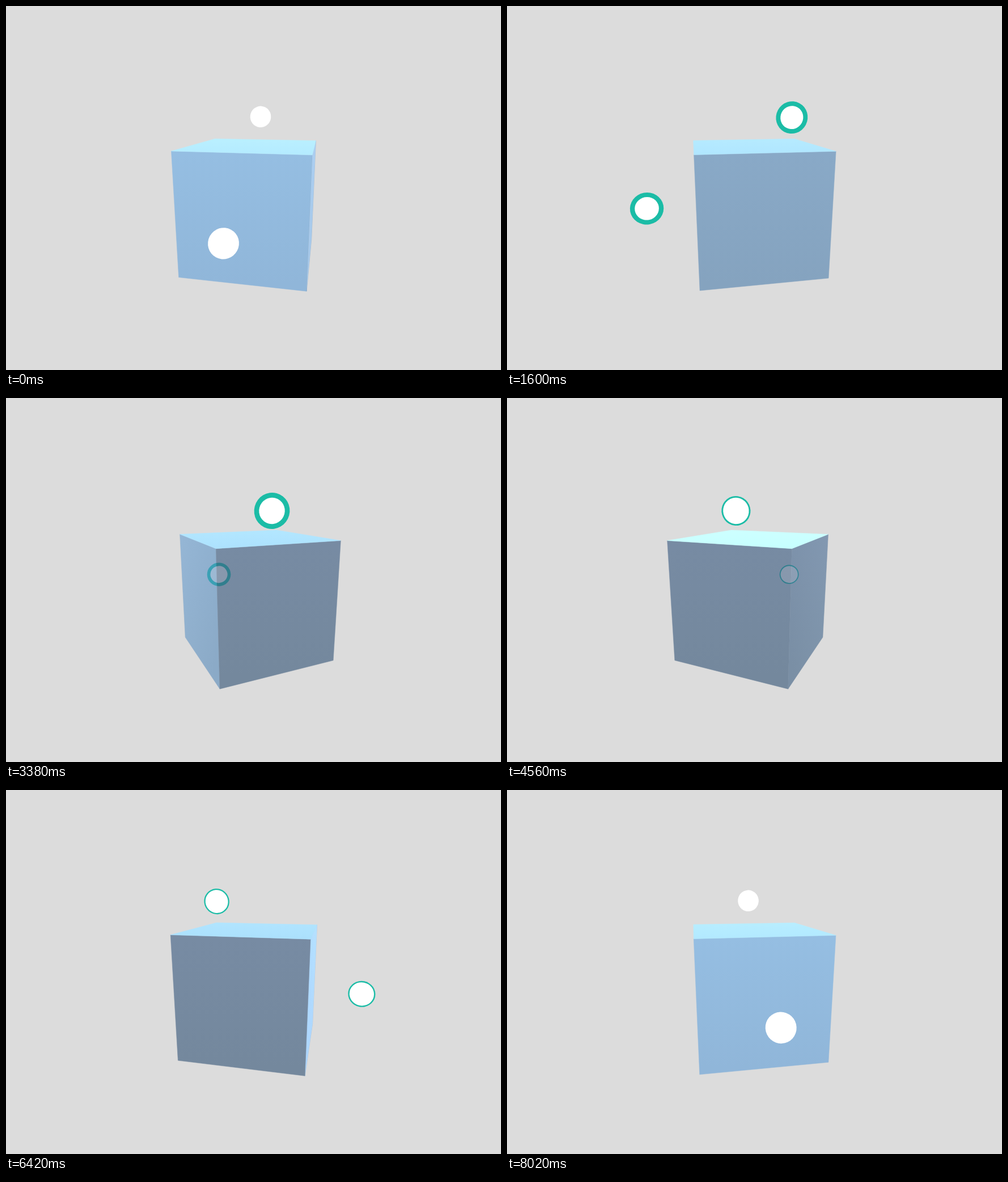
Write an HTML page with a canvas that moves like this. It is 873x642 px and loops after 8.04 s.

```html
<!DOCTYPE html>
<html>
<head>
<meta charset="utf-8">
<style>
html, body { margin: 0; width: 100%; height: 100%; overflow: hidden; background: #dcdcdc; }
canvas { display: block; }
</style>
</head>
<body>
<canvas id="stage" width="873" height="642"></canvas>
<script>
const ctx = document.getElementById('stage').getContext('2d');
const W = 873, H = 642, LOOP = 8040, RAD = Math.PI / 180;
const FOCAL = 580, SIN = 0.2361, COS = 0.9717; // camera at distance 1, tilted down
const TOP = 0.1299, BOTTOM = -0.2238, HALF = 0.1768, CORNER = HALF * Math.SQRT2;
const BALL = 0.0334, TEAL = '#1bbca6';
const PULSE = { start: 565, period: 1880, grow: 1180, size: 0.4 };

// time in ms, turn in degrees
const TURN = [[0, 33.3], [980, -8.5], [2230, -60.9], [3380, -109.7],
  [4560, -160.3], [6420, -238], [8020, -304.65], [8040, -305.5]];

const DARK = [[119, 139, 163], [116, 136, 157]];
const SIDES = [
  { angle: -45, shade: [[149, 190, 226], [144, 182, 217]] },
  { angle: 45, shade: [[137, 169, 199], [133, 163, 191]] },
  { angle: 135, shade: DARK },
  { angle: 225, shade: DARK },
];

const rgb = c => `rgb(${c.map(v => Math.max(0, Math.min(255, Math.round(v)))).join()})`;

function turnAt(t) {
  const i = Math.max(1, TURN.findIndex(k => k[0] > t));
  const [t0, a0] = TURN[i - 1], [t1, a1] = TURN[i];
  return a0 + (a1 - a0) * (t - t0) / (t1 - t0);
}

function pulseAt(t) {
  const p = (t - PULSE.start + PULSE.period) % PULSE.period / PULSE.grow;
  return p < 1 ? 1 + PULSE.size * Math.sin(p * Math.PI / 2) : 1;
}

function project(angle, radius, y) {
  const x = radius * Math.sin(angle * RAD), z = radius * Math.cos(angle * RAD);
  const depth = 1 - y * SIN - z * COS, k = FOCAL / depth;
  return { x: W / 2 + x * k, y: H / 2 - (y * COS - z * SIN) * k, wx: x, wz: z, k };
}

function trace(points) {
  points.forEach((p, i) => i ? ctx.lineTo(p.x, p.y) : ctx.moveTo(p.x, p.y));
  ctx.closePath();
}

function gradient(x0, y0, x1, y1, from, to) {
  const g = ctx.createLinearGradient(x0, y0, x1, y1);
  g.addColorStop(0, rgb(from));
  g.addColorStop(1, rgb(to));
  return g;
}

function paint(points, fill) {
  ctx.beginPath();
  trace(points);
  ctx.fillStyle = ctx.strokeStyle = fill;
  ctx.lineWidth = 0.5;
  ctx.fill();
  ctx.stroke();
}

// Extra light on a wall seen at a grazing angle
function glow(p, angle) {
  const vx = -p.wx, vy = SIN + 0.047, vz = COS - p.wz;
  const facing = (vx * Math.sin(angle * RAD) + vz * Math.cos(angle * RAD)) / Math.hypot(vx, vy, vz);
  const g = 38 * (1 - Math.max(0, facing)) ** 5;
  return [g, g * 1.1, g * 1.25];
}

function drawSide(side, turn) {
  const a = side.angle + turn;
  if (COS * Math.cos(a * RAD) <= HALF) return null;
  const [tl, tr, br, bl] = [[-45, TOP], [45, TOP], [45, BOTTOM], [-45, BOTTOM]]
    .map(([d, y]) => project(a + d, CORNER, y));
  const face = [tl, tr, br, bl];
  paint(face, gradient(0, (tl.y + tr.y) / 2, 0, (bl.y + br.y) / 2, ...side.shade));
  ctx.globalCompositeOperation = 'lighter';
  ctx.beginPath();
  trace(face);
  ctx.fillStyle = gradient(tl.x, 0, tr.x, 0, glow(tl, a), glow(tr, a));
  ctx.fill();
  ctx.globalCompositeOperation = 'source-over';
  return face;
}

function drawTop(turn) {
  const face = [0, 90, 180, 270].map(d => project(turn + d, CORNER, TOP));
  const shine = 28 * Math.max(0, Math.cos((turn + 160) * RAD)) ** 6
    + 9 * Math.max(0, Math.cos((turn - 20) * RAD));
  const back = [177 + shine, 229 + shine * 1.2, 255];
  const front = [170 + shine, 223 + shine * 1.2, 252 + shine];
  paint(face, gradient(0, 233, 0, 267, back, front));
  return face;
}

function oval(p, scale) {
  const dx = p.x - W / 2, dy = p.y - H / 2, r = BALL * p.k * scale;
  const stretch = Math.hypot(1, dx / FOCAL, dy / FOCAL);
  ctx.moveTo(p.x, p.y);
  const path = new Path2D();
  path.ellipse(p.x, p.y, r * stretch, r, Math.atan2(dy, dx), 0, 2 * Math.PI);
  return path;
}

function drawBall(p, scale) {
  if (scale > 1) {
    ctx.fillStyle = TEAL;
    ctx.fill(oval(p, scale));
  }
  ctx.fillStyle = '#fff';
  ctx.fill(oval(p, 1));
}

// The ball seen through the cube
function drawGhost(p, scale, faces) {
  ctx.save();
  ctx.beginPath();
  faces.forEach(trace);
  ctx.clip();
  const inner = oval(p, 1);
  if (scale > 1) {
    const ring = oval(p, scale);
    ring.addPath(inner);
    ctx.globalCompositeOperation = 'multiply';
    ctx.fillStyle = 'rgb(105,233,224)';
    ctx.fill(ring, 'evenodd');
    ctx.globalCompositeOperation = 'source-over';
  }
  ctx.fillStyle = 'rgba(255,255,255,.12)';
  ctx.fill(inner);
  ctx.restore();
}

function draw(t) {
  const turn = turnAt(t), scale = pulseAt(t);
  const upper = project(turn + 135, 0.112, 0.2091);
  const side = project(turn - 45, 0.318, -0.0474);
  const behind = side.wz < 0;

  ctx.fillStyle = '#dcdcdc';
  ctx.fillRect(0, 0, W, H);
  if (behind) drawBall(side, scale);
  const faces = SIDES.map(s => drawSide(s, turn)).filter(Boolean);
  faces.push(drawTop(turn));
  if (behind) drawGhost(side, scale, faces);
  else drawBall(side, scale);
  drawBall(upper, scale);
}

const begin = performance.now();
function tick() {
  draw((performance.now() - begin) % LOOP);
  requestAnimationFrame(tick);
}
tick();
</script>
</body>
</html>
```
